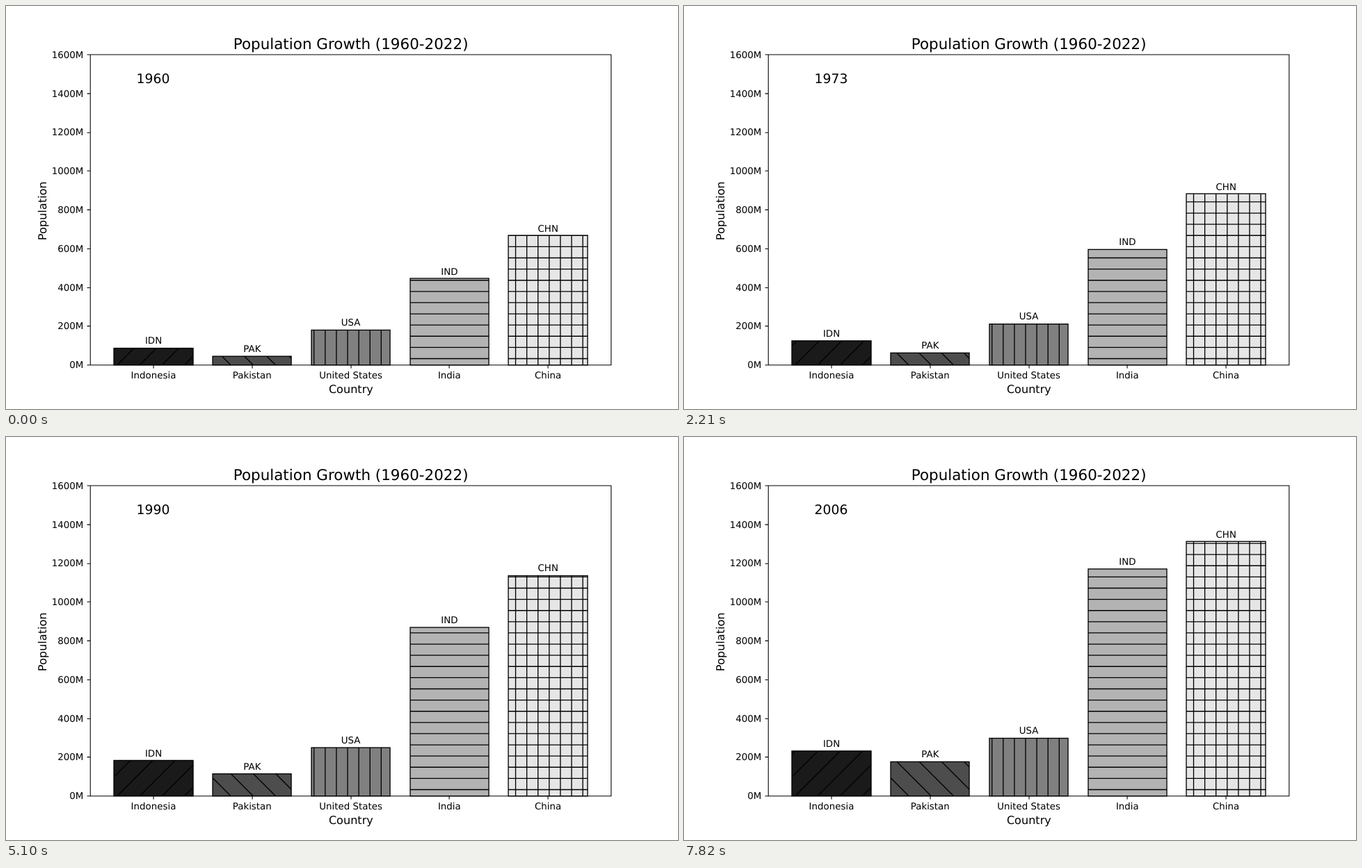
An HTML page that plays this animation: 966x580 px, repeating every 7.99 s.

```html
<!DOCTYPE html>
<html lang="en">
<head>
<meta charset="utf-8">
<title>Population Growth</title>
<style>
  html, body { margin: 0; width: 100%; height: 100%; overflow: hidden; background: #fff; }
  svg { display: block; }
  text { font-family: "DejaVu Sans", sans-serif; text-rendering: geometricPrecision; }
</style>
</head>
<body>
<svg id="chart" width="966" height="580" viewBox="0 0 1000 600" preserveAspectRatio="none"></svg>
<script>
// The chart is laid out on a 10 by 6 inch sheet at 100 dots per inch.
const STEP = 170, YEARS = 47, FIRST_YEAR = 1960;
const HEIGHT = 600, INCH = 100, PT = INCH / 72;
const LEFT = 125, RIGHT = 900, TOP = 72, BOTTOM = 534, MAX = 1600;
const SLOT = (RIGHT - LEFT) / 5.28, BAR = SLOT * 0.8;

// Key points are [years since the start, millions of people].
const countries = [
  { name: "Indonesia", code: "IDN", hatch: "/", keys: [[0, 88], [15, 131], [30, 182], [46, 233]] },
  { name: "Pakistan", code: "PAK", hatch: "\\", keys: [[0, 46], [15, 68], [30, 115], [46, 178]] },
  { name: "United States", code: "USA", hatch: "|", keys: [[0, 181], [15, 216], [30, 250], [46, 298]] },
  { name: "India", code: "IND", hatch: "-", keys: [[0, 446], [15, 623], [30, 870], [46, 1172]] },
  { name: "China", code: "CHN", hatch: "-|",
    keys: [[0, 667], [2, 666], [8, 775], [14, 900], [23, 1023], [31, 1151], [39, 1253], [46, 1311]] },
];

const chart = document.getElementById("chart");
const snap = v => Math.floor(v + 0.5) + 0.5;
const toY = value => BOTTOM - value / MAX * (BOTTOM - TOP);
const centerOf = i => LEFT + SLOT * (0.64 + i);
const line = (x1, y1, x2, y2) => `M${x1} ${y1}L${x2} ${y2}`;

function add(tag, attrs, parent = chart) {
  const node = document.createElementNS("http://www.w3.org/2000/svg", tag);
  for (const key in attrs) node.setAttribute(key, attrs[key]);
  return parent.appendChild(node);
}

function label(content, x, y, points, extra = {}) {
  const node = add("text", { x, y, "font-size": points * PT, "text-anchor": "middle", ...extra });
  node.textContent = content;
  return node;
}

// Hatches sit on a grid that starts at the lower left corner of the sheet.
function hatchPath(kinds) {
  let path = "";
  for (let k = -60; k < 60; k++) {
    const straight = (k + 0.5) * INCH / 6, slant = HEIGHT - k * INCH / 3;
    for (const kind of kinds) {
      if (kind === "-") path += line(LEFT, HEIGHT - straight, RIGHT, HEIGHT - straight);
      if (kind === "|") path += line(straight, TOP, straight, BOTTOM);
      if (kind === "/") path += line(slant - BOTTOM, BOTTOM, slant - TOP, TOP);
      if (kind === "\\") path += line(BOTTOM - slant, BOTTOM, TOP - slant, TOP);
    }
  }
  return path;
}

// Smooth curve through the key points; each slope comes from the neighbours.
function valueAt(keys, year) {
  const slope = i => {
    const a = keys[Math.max(i - 1, 0)], b = keys[Math.min(i + 1, keys.length - 1)];
    return (b[1] - a[1]) / (b[0] - a[0]);
  };
  const i = Math.max(1, keys.findIndex(key => key[0] >= year));
  const [x0, y0] = keys[i - 1], [x1, y1] = keys[i];
  const span = x1 - x0, t = (year - x0) / span, u = 1 - t;
  return y0 + (y1 - y0) * t * t * (3 - 2 * t) + span * t * u * (slope(i - 1) * u - slope(i) * t);
}

const bars = countries.map(({ name, code, hatch, keys }, i) => {
  const center = centerOf(i), x = snap(center - BAR / 2), width = snap(center + BAR / 2) - x;
  const shade = Math.round(255 * (0.1 + 0.2 * i));
  const mask = add("rect", { x, width }, add("clipPath", { id: "clip" + i }));
  const face = add("rect", { x, width, fill: `rgb(${shade},${shade},${shade})` });
  add("path", { d: hatchPath(hatch), stroke: "#000", "stroke-width": PT, "clip-path": `url(#clip${i})` });
  const edge = add("rect", { x, width, fill: "none", stroke: "#000", "stroke-width": PT });
  label(name, center + 0.5, 554.6, 10);
  return { keys, rects: [mask, face, edge], tag: label(code, center + 0.6, 0, 10) };
});

// Frame, ticks and fixed text
const tick = 3.5 * PT, left = snap(LEFT), bottom = snap(BOTTOM);
let axes = `M${left} ${snap(TOP)}H${snap(RIGHT)}V${bottom}H${left}Z`;
countries.forEach((_, i) => axes += `M${snap(centerOf(i))} ${bottom}v${tick}`);
for (let value = 0; value <= MAX; value += 200) {
  axes += `M${left} ${snap(toY(value))}h${-tick}`;
  label(value + "M", LEFT - 2 * tick, toY(value) + 5.3, 10, { "text-anchor": "end" });
}
add("path", { d: axes, fill: "none", stroke: "#000", "stroke-width": 0.8 * PT });

const middleX = (LEFT + RIGHT) / 2;
label("Population Growth (1960-2022)", middleX + 0.6, 64, 16);
label("Country", middleX + 0.8, 576, 12);
label("Population", 0, 0, 12, { transform: "translate(59.7 305) rotate(-90)" });
const yearLabel = label("", centerOf(0), 115.1, 14);

function draw() {
  const year = Math.floor(performance.now() / STEP) % YEARS;
  yearLabel.textContent = FIRST_YEAR + year;
  for (const { keys, rects, tag } of bars) {
    const top = toY(valueAt(keys, year)), y = snap(top);
    for (const rect of rects) {
      rect.setAttribute("y", y);
      rect.setAttribute("height", bottom - y);
    }
    tag.setAttribute("y", Math.round(top - 5.7));
  }
  requestAnimationFrame(draw);
}
draw();
</script>
</body>
</html>
```
